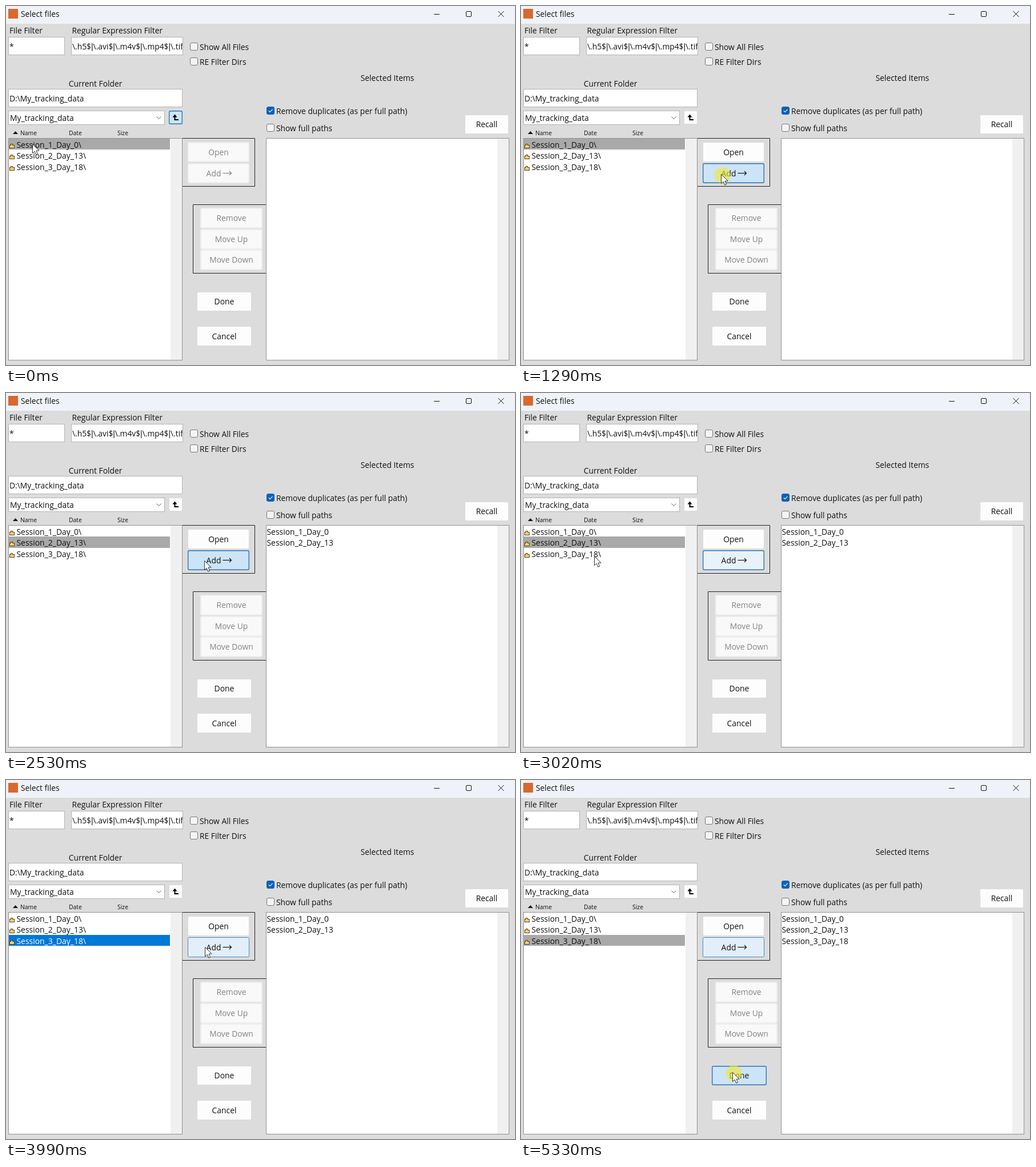
An HTML page with a canvas for the animation above (5.4 s loop, 891 by 628 pixels).

```html
<!DOCTYPE html>
<html lang="en">
<head>
<meta charset="utf-8">
<title>Select files</title>
<style>
html, body { margin: 0; width: 100%; height: 100%; overflow: hidden; background: #dcdcdc; }
canvas { display: block; width: 891px; height: 628px; }
</style>
</head>
<body>
<canvas id="stage" width="891" height="628"></canvas>
<script>
const ctx = document.getElementById('stage').getContext('2d');
const LOOP = 5400;
const SANS = '"Open Sans", "Noto Sans", sans-serif';
const INK = '#111';
const ROW = 19.5;

// Each session is picked on the left, then added to the right
const SESSIONS = [
  { name: 'Session_1_Day_0', pick: 200, add: 1290 },
  { name: 'Session_2_Day_13', pick: 1830, add: 2460 },
  { name: 'Session_3_Day_18', pick: 3090, add: 4060 }
];
const FINISH = 5328;
const LAG = 70;
const CLICKS = [...SESSIONS.flatMap(s => [s.pick, s.add]), FINISH];

const OPEN = [318, 238, 108, 35];
const ADD = [318, 275, 108, 35];
const DONE = [334, 500, 96, 34];

// Where the pointer rests and when
const STOPS = [
  { x: 46, y: 241, from: 0, to: 200 },
  { x: 353, y: 264, from: 740, to: 850 },
  { x: 350, y: 294, from: 1220, to: 1430 },
  { x: 115, y: 268, from: 1830, to: 1980 },
  { x: 347, y: 293, from: 2390, to: 2600 },
  { x: 128, y: 285, from: 3020, to: 3150 },
  { x: 348, y: 292, from: 3720, to: 4190 },
  { x: 394, y: 488, from: 4470, to: 4600 },
  { x: 374, y: 495, from: 4740, to: 5060 },
  { x: 370, y: 511, from: 5260, to: LOOP }
];

// Button looks: fill, border, border width, ink
const LOOKS = {
  off: ['#f9f9f9', '#eeeeee', 2, '#838383'],
  plain: ['#fdfdfd', '#dadada', 1, INK],
  faint: ['#f4f9fd', '#8fbbe0', 1, INK],
  hover: ['#e2effa', '#3f8bcb', 1, INK],
  press: ['#cce4f7', '#2d74b4', 1.4, INK],
  focus: ['#e8f2fa', '#2d74b4', 1.4, INK]
};

function pointerAt(t) {
  const i = STOPS.findIndex(s => t <= s.to);
  const b = STOPS[i];
  if (t >= b.from) return b;
  const a = STOPS[i - 1];
  const u = (t - a.to) / (b.from - a.to);
  const k = u * u * (3 - 2 * u);
  return { x: a.x + (b.x - a.x) * k, y: a.y + (b.y - a.y) * k };
}

function isOver([x, y, w, h], t) {
  const p = pointerAt(t);
  return p.x >= x && p.x < x + w && p.y >= y && p.y < y + h;
}

const hoverLook = (area, t) => isOver(area, t) ? 'faint' : 'plain';

// Pressed by its click, focused until another click, then fading out
function addLook(t) {
  const past = CLICKS.filter(c => c <= t);
  const last = past[past.length - 1];
  if (SESSIONS.some(s => s.add === last)) return t - last < 200 ? 'press' : 'focus';
  if (isOver(ADD, t)) return 'hover';
  if (past.length < 2) return 'plain';
  return t - last < 200 ? 'hover' : 'faint';
}

function rect(x, y, w, h, fill) {
  ctx.fillStyle = fill;
  ctx.fillRect(x, y, w, h);
}

function box(x, y, w, h, edge = '#b4b4b4') {
  rect(x, y, w, h, edge);
  rect(x + 1, y + 1, w - 2, h - 2, '#fff');
}

function text(s, x, y, size = 13.8, color = INK, align = 'left', font = SANS) {
  ctx.font = `${size}px ${font}`;
  ctx.fillStyle = color;
  ctx.textAlign = align;
  ctx.fillText(s, x, y);
  return ctx.measureText(s).width;
}

function trace(points) {
  ctx.beginPath();
  points.forEach(([x, y]) => ctx.lineTo(x, y));
}

function line(points, color = INK, width = 1) {
  trace(points);
  ctx.strokeStyle = color;
  ctx.lineWidth = width;
  ctx.stroke();
}

function shape(points, fill) {
  trace(points);
  ctx.closePath();
  ctx.fillStyle = fill;
  ctx.fill();
}

function rounded(x, y, w, h, r, fill, edge, width = 1) {
  ctx.beginPath();
  ctx.roundRect(x + width / 2, y + width / 2, w - width, h - width, r);
  ctx.fillStyle = fill;
  ctx.fill();
  ctx.strokeStyle = edge;
  ctx.lineWidth = width;
  ctx.stroke();
}

function button(label, [x, y, w, h], look, shift = 0) {
  const [fill, edge, width, ink] = LOOKS[look];
  rounded(x, y, w, h, 2, fill, edge, width);
  text(label, x + w / 2 + shift, Math.round(y + h / 2 + 5.4), 13.9, ink, 'center');
  return ink;
}

function check(label, x, y, on) {
  rounded(x, y, 14, 14, 2.5, on ? '#0b62b8' : '#f4f4f4', on ? '#0b62b8' : '#777');
  if (on) line([[x + 3.8, y + 7.2], [x + 6.2, y + 9.5], [x + 10.5, y + 4.8]], '#fff', 1.1);
  text(label, x + 17, y + 13);
}

function titleBar() {
  rect(0, 0, 891, 31, '#eff3f9');
  rect(4, 5, 17, 17, '#d9682d');
  text('Select files', 26, 19);
  line([[749, 14.5], [759, 14.5]]);
  rounded(805, 9, 10, 10, 1.5, '#eff3f9', INK);
  line([[861.5, 9], [871.5, 19]]);
  line([[871.5, 9], [861.5, 19]]);
}

function filters() {
  text('File Filter', 6, 48);
  text('Regular Expression Filter', 115.5, 48);
  box(4, 54, 99, 32);
  box(114, 54, 196, 32);
  text('*', 6, 76);
  ctx.save();
  ctx.beginPath();
  ctx.rect(115, 55, 194, 30);
  ctx.clip();
  let x = 116;
  for (const part of '\\.h5$|\\.avi$|\\.m4v$|\\.mp4$|\\.tif'.split(/(\|)/)) {
    x += text(part, x, 76, 13.8, INK, 'left', part === '|' ? '"Liberation Sans", sans-serif' : SANS);
  }
  ctx.restore();
  check('Show All Files', 322, 64, false);
  check('RE Filter Dirs', 322, 90, false);
}

function folderBar(t) {
  text('Current Folder', 156.5, 141, 13.8, INK, 'center');
  box(4, 145, 305, 32);
  text('D:\\My_tracking_data', 6, 167);
  box(4, 183, 274, 25);
  text('My_tracking_data', 7, 201);
  line([[263.5, 193.5], [267.5, 197.5], [271.5, 193.5]], '#555');
  button('', [285, 183, 24, 24], t < SESSIONS[0].pick ? 'press' : 'plain');
  line([[295.5, 192], [295.5, 199], [302, 199]], '#000', 2);
  shape([[291.5, 194.5], [295.5, 189.5], [299.5, 194.5]], '#000');
  shape([[12, 224], [16.5, 219], [21, 224]], INK);
  ['Name', 'Date', 'Size'].forEach((s, i) => text(s, 25 + i * 85, 226, 10.4));
}

function folderIcon(x, y) {
  rect(x, y + 2, 9, 6, '#5d4512');
  rect(x + 2, y, 4, 3, '#5d4512');
  rect(x + 1, y + 3, 7, 4, '#f0cf70');
  rect(x + 3, y + 1, 2, 2, '#f0cf70');
}

function lists(t) {
  for (const [x, w] of [[4, 305], [455, 426]]) {
    box(x, 231, w, 389, '#929292');
    rect(x + w - 21, 232, 20, 387, '#f0f0f0');
  }
  const picked = SESSIONS.filter(s => s.pick <= t).length - 1;
  SESSIONS.forEach((s, i) => {
    const top = 232 + Math.floor(i * ROW);
    const bottom = 232 + Math.floor((i + 1) * ROW);
    const active = i === picked && t < s.add;
    if (i === Math.max(0, picked)) rect(5, top, 282, bottom - top, active ? '#0078d7' : '#a9a9a9');
    folderIcon(6, top + 9);
    text(s.name + '\\', 18.5, top + 16, 13.9, active ? '#fff' : INK);
    if (t >= s.add + LAG) text(s.name, 456.5, top + 16, 13.9);
  });
}

function buttons(t) {
  line([[309, 231.5], [435.5, 231.5], [435.5, 315.5], [309, 315.5]], '#222');
  line([[455, 347.5], [327.5, 347.5], [327.5, 467.5], [455, 467.5]], '#222');
  const ready = t >= SESSIONS[0].pick + LAG;
  button('Open', OPEN, ready ? hoverLook(OPEN, t) : 'off');
  const ink = button('Add', ADD, ready ? addLook(t) : 'off', -8.5);
  line([[379.5, 292.5], [394.5, 292.5]], ink, 1.2);
  line([[391, 289], [394.5, 292.5], [391, 296]], ink, 1.2);
  ['Remove', 'Move Up', 'Move Down'].forEach((s, i) => {
    button(s, [340, 353 + Math.round(i * 36.7), 109, 36], 'off');
  });
  button('Done', DONE, t >= FINISH ? 'press' : hoverLook(DONE, t));
  button('Cancel', [334, 560, 96, 35], 'plain');
  button('Recall', [803, 190, 77, 34], 'plain');
}

function selection() {
  text('Selected Items', 667.5, 131, 13.8, INK, 'center');
  check('Remove duplicates (as per full path)', 456, 176, true);
  check('Show full paths', 456, 206, false);
}

function pointer(t) {
  const { x, y } = pointerAt(t);
  if (CLICKS.some(c => t >= c && t < c + LAG)) {
    ctx.fillStyle = 'rgba(238, 232, 50, 0.62)';
    ctx.beginPath();
    ctx.arc(x + 2.5, y + 2, 14, 0, Math.PI * 2);
    ctx.fill();
  }
  ctx.save();
  ctx.translate(Math.round(x) + 0.5, Math.round(y) + 0.5);
  shape([[0, 0], [0, 16], [3.7, 12.7], [6.3, 18.7], [9, 17.6], [6.5, 11.7], [11.6, 11.6]], '#fff');
  ctx.strokeStyle = '#333';
  ctx.lineWidth = 1;
  ctx.stroke();
  ctx.restore();
}

function draw(t) {
  rect(0, 0, 891, 628, '#dcdcdc');
  titleBar();
  filters();
  folderBar(t);
  lists(t);
  selection();
  buttons(t);
  pointer(t);
}

const start = performance.now();
function tick() {
  draw((performance.now() - start) % LOOP);
  requestAnimationFrame(tick);
}
tick();
</script>
</body>
</html>
```
